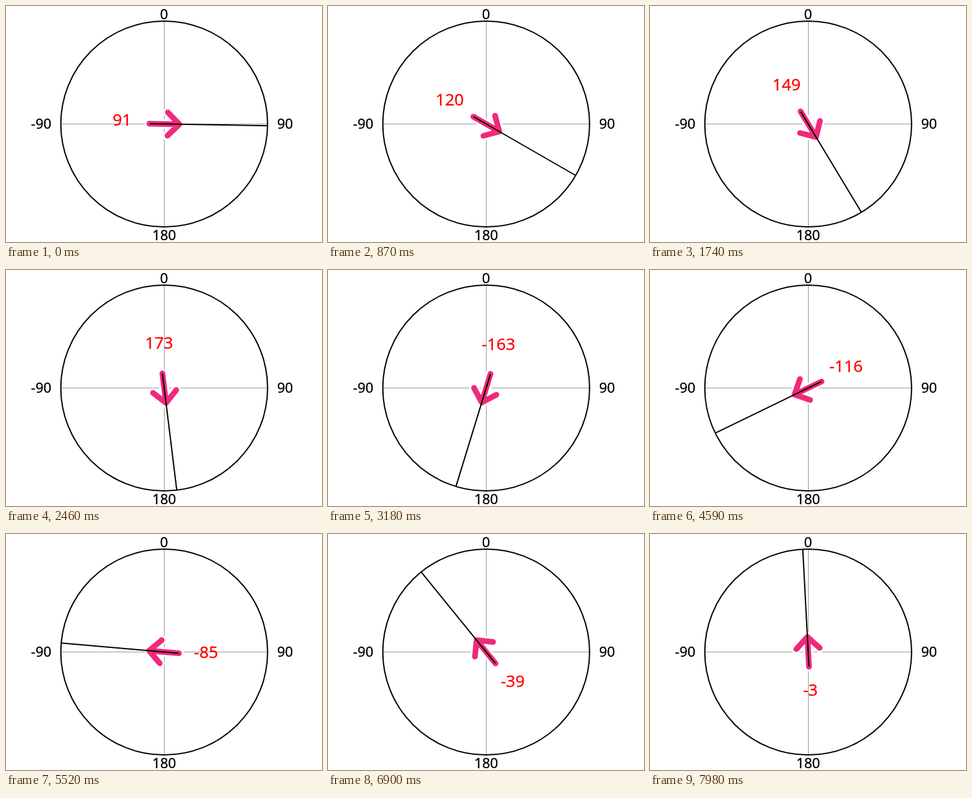
These frames come from a looping animation (500 px wide and 375 px high, 8000 ms). An HTML page:

```html
<!DOCTYPE html>
<html lang="en">
<head>
<meta charset="utf-8">
<title>Compass dial</title>
<style>
  html, body { margin: 0; width: 100%; height: 100%; overflow: hidden; background: #fff; }
  svg { display: block; width: 500px; height: 375px; }
  text { font-family: "Open Sans", "Noto Sans", sans-serif; font-size: 22px; text-anchor: middle;
         stroke: currentColor; stroke-width: .4px; }
  #value { font-size: 26px; fill: #f00; color: #f00; }
  .axis { stroke: #999; stroke-width: 1; }
  .arrow { fill: none; stroke-linecap: round; stroke-linejoin: round; }
</style>
</head>
<body>
<svg viewBox="0 0 500 375">
  <path class="axis" d="M87 187.5H414M250.5 24V351"/>
  <circle cx="250.3" cy="187.5" r="163.6" fill="none" stroke="#000" stroke-width="2"/>
  <text x="250" y="20.8">0</text>
  <text x="441.5" y="194.5">90</text>
  <text x="250.3" y="371.5">180</text>
  <text x="55.7" y="194.5">-90</text>
  <g id="needle">
    <path class="arrow" stroke="#fff" stroke-width="15" d="M0 23.5V-24M-18.5 -5.5L0 -24L18.5 -5.5"/>
    <path class="arrow" stroke="#ef2a7b" stroke-width="9" d="M0 23.5V-24M-18.5 -5.5L0 -24L18.5 -5.5"/>
    <path stroke="#000" stroke-width="2" d="M0 23V-163.5"/>
  </g>
  <text id="value"></text>
</svg>
<script>
  const LOOP = 8000, STEP = 30, START = 91;
  const CX = 250.3, CY = 187.5, LABEL_RADIUS = 66.6, LABEL_BASELINE = 190.8;
  const needle = document.getElementById('needle');
  const value = document.getElementById('value');

  function draw(time) {
    const angle = START + Math.floor(time % LOOP / STEP);
    const rad = angle * Math.PI / 180;
    needle.setAttribute('transform', `translate(${CX} ${CY}) rotate(${angle})`);
    // The reading sits on the tail side of the needle.
    value.setAttribute('x', CX - LABEL_RADIUS * Math.sin(rad));
    value.setAttribute('y', LABEL_BASELINE + LABEL_RADIUS * Math.cos(rad));
    value.textContent = angle > 180 ? angle - 360 : angle;
  }

  const begin = performance.now();
  function tick() {
    draw(performance.now() - begin);
    requestAnimationFrame(tick);
  }
  tick();
</script>
</body>
</html>
```
